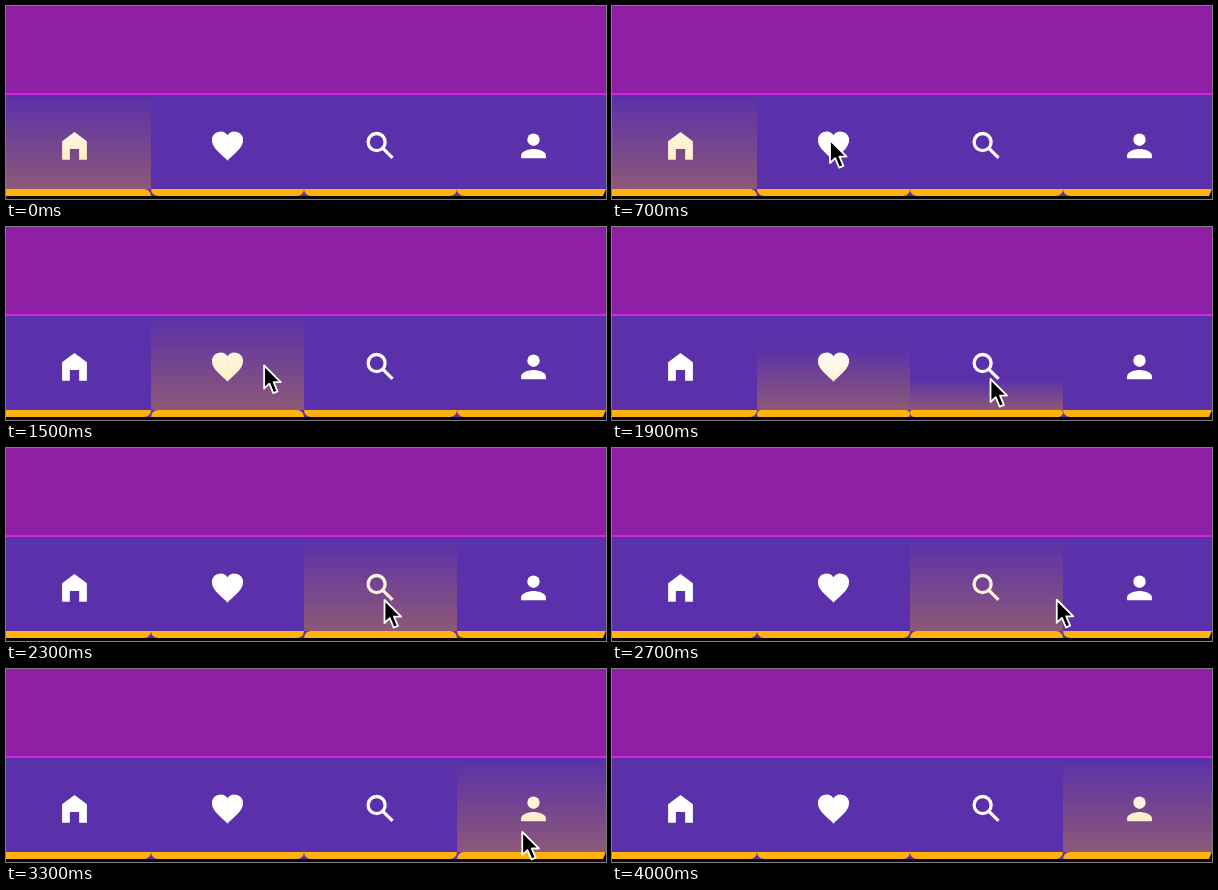
Recreate the animation shown at these times as an HTML page. Size 600 px wide and 193 px high, loop 4.1 s.

```html
<!DOCTYPE html>
<html lang="en">
<head>
<meta charset="utf-8">
<title>Tab bar</title>
<style>
  html, body { margin: 0; width: 100%; height: 100%; overflow: hidden; background: #8f1fa4; }
  svg { display: block; width: 600px; height: 193px; }
</style>
</head>
<body>
<svg viewBox="0 0 600 193">
  <defs>
    <linearGradient id="glow" x1="0" y1="0" x2="0" y2="1">
      <stop offset="0" stop-color="#ffb300" stop-opacity="0"/>
      <stop offset="1" stop-color="#ffb300" stop-opacity=".31"/>
    </linearGradient>
    <!-- Icons on a 24 unit grid, centred on x = 0 -->
    <g id="home"><path d="M0 3L-8 9V21H-3V14H3V21H8V9Z"/></g>
    <g id="heart">
      <path id="half" d="M.2 21.35H0L-1.45 20C-6.6 15.4 -10 12.3 -10 8.5A5.5 5.5 0 0 1 0 5.1H.2Z"/>
      <use href="#half" transform="scale(-1 1)"/>
    </g>
    <g id="search" fill="none" stroke="#fff" stroke-width="2.1">
      <circle cx="-2.5" cy="9.5" r="5.5"/>
      <path d="M1.6 13.6L7.75 19.75"/>
    </g>
    <g id="person">
      <circle cy="8" r="4"/>
      <path d="M-8 20V18C-8 15.34 -2.67 14 0 14S8 15.34 8 18V20Z"/>
    </g>
  </defs>
  <rect width="600" height="193" fill="#8f1fa4"/>
  <rect y="88" width="600" height="102" fill="#5a30ab"/>
  <rect y="87" width="600" height="2" fill="#d026dc"/>
  <g id="tabs" fill="#fff"></g>
  <path d="M0 190H597L600 183V193H0Z" fill="#0b0709"/>
  <path id="cursor" d="M0 0V23L5.2 18.2L9.2 27.6L13.4 25.8L9.5 16.6H16.6Z"
    fill="#000" stroke="#fff" stroke-width="1.8" stroke-linejoin="round"/>
</svg>
<script>
  const LOOP = 4100, STEP = 100, FADE = 300;
  const LEFT = -8, WIDTH = 153, TOP = 89, BASE = 183, END = 190, RADIUS = 7;

  // Each tab lights up from its start time
  const tabs = [
    { icon: 'home', start: -FADE },
    { icon: 'heart', start: 800 },
    { icon: 'search', start: 1800 },
    { icon: 'person', start: 2900 }
  ];

  // The pointer comes in from below, rests on three tabs and drops out
  const moves = [
    { to: [218, 134], end: 700, time: 700 },
    { to: [378.5, 152], end: 1700, time: 300 },
    { to: [511, 151.5], end: 2900, time: 400 },
    { to: [532, 197], end: 3700, time: 600 }
  ];
  const entry = [202, 196];

  const clamp = v => Math.min(1, Math.max(0, v));
  const ease = p => (1 - Math.cos(Math.PI * p)) / 2;

  function add(parent, name, attrs) {
    const el = document.createElementNS('http://www.w3.org/2000/svg', name);
    for (const key in attrs) el.setAttribute(key, attrs[key]);
    return parent.appendChild(el);
  }

  const group = document.getElementById('tabs');
  const cursor = document.getElementById('cursor');
  tabs.forEach((tab, i) => {
    const x = tab.x = LEFT + i * WIDTH;
    add(group, 'use', {
      href: '#' + tab.icon,
      transform: `translate(${x + WIDTH / 2} 121.3) scale(1.55)`
    });
    tab.glow = add(group, 'rect', { x, width: WIDTH, fill: 'url(#glow)' });
    tab.bar = add(group, 'path', { fill: '#ffb20d' });
  });

  // Bar with separate top and bottom corner radii
  function barPath(x, top, bottom) {
    const right = x + WIDTH;
    const arc = (r, px, py) => `A${r} ${r} 0 0 1 ${px} ${py}`;
    return `M${x + top} ${BASE}H${right - top}` + arc(top, right, BASE + top) +
      `V${END - bottom}` + arc(bottom, right - bottom, END) +
      `H${x + bottom}` + arc(bottom, x, END - bottom) +
      `V${BASE + top}` + arc(top, x + top, BASE) + 'Z';
  }

  function pointer(t) {
    let [x, y] = entry;
    for (const { to, end, time } of moves) {
      const p = ease(clamp((t - end + time) / time));
      x += (to[0] - x) * p;
      y += (to[1] - y) * p;
    }
    return [x, y];
  }

  function draw(t) {
    const lit = tab => tab ? clamp((t - tab.start) / FADE) : 0;
    tabs.forEach((tab, i) => {
      const level = lit(tab) - lit(tabs[i + 1]);
      const height = (BASE - TOP) * level;
      tab.glow.setAttribute('y', BASE - height);
      tab.glow.setAttribute('height', height);
      tab.bar.setAttribute('d', barPath(tab.x, RADIUS * level, RADIUS * (1 - level)));
    });
    cursor.setAttribute('transform', `translate(${pointer(t)})`);
  }

  const begin = performance.now();
  function tick() {
    const t = (performance.now() - begin) % LOOP;
    draw(Math.floor(t / STEP) * STEP);
    requestAnimationFrame(tick);
  }
  tick();
</script>
</body>
</html>
```
